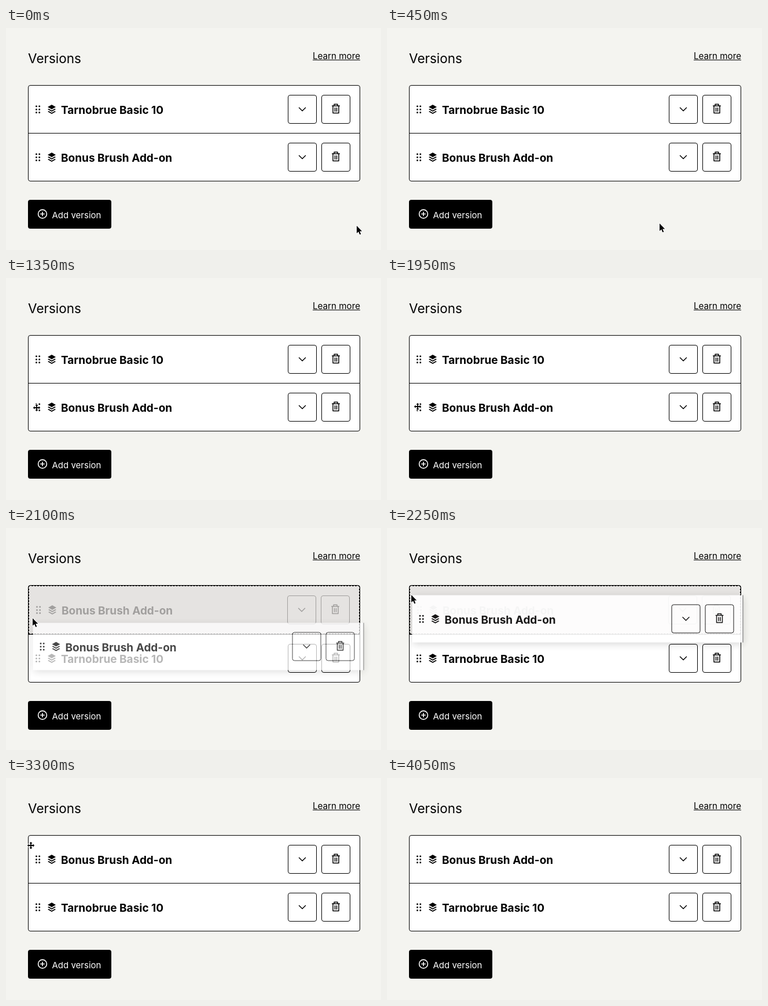
Recreate the animation shown at these times as an HTML page. Size 648 by 385 pixels, loop 5.03 s.

```html
<!DOCTYPE html>
<html lang="en">
<head>
<meta charset="utf-8">
<title>Reorder versions</title>
<style>
  html, body { margin: 0; width: 100%; height: 100%; overflow: hidden; background: #f4f4f0; }
  svg { position: absolute; left: 0; top: 0; font-family: Inter, sans-serif; }
  .name { font-size: 19px; font-weight: 700; }
  .line { fill: none; stroke: #000; }
  .icon { fill: none; stroke: #000; stroke-width: 1.5; stroke-linecap: round; stroke-linejoin: round; }
  #slot { box-sizing: border-box; height: 84px; background: #e5e3e1; border: 1px dashed #000; }
  #ghost {
    position: absolute; box-sizing: border-box; width: 572px; height: 82px;
    background: #fff; border-right: 1px solid #444;
    box-shadow: 0 3px 13px rgba(0, 0, 0, .18);
    will-change: transform;
  }
  #ghost svg { left: -1px; top: -1px; }
  #cursor path { fill: #000; stroke: #fff; stroke-width: 2; stroke-linejoin: round; paint-order: stroke; }
</style>
</head>
<body>
<svg width="648" height="385">
  <text x="38" y="61" font-size="22.5">Versions</text>
  <text x="612" y="53.5" font-size="15.2" text-anchor="end">Learn more</text>
  <path class="line" d="M530 55.5H612"/>
  <rect id="list" class="line" x="38.5" y="99.5" width="573" rx="3.5" style="fill:#fff"/>
  <foreignObject id="holder" x="39" y="100" width="572" height="84"><div id="slot"></div></foreignObject>
  <path id="divider" class="line" d="M39 182.5H611"/>
  <g id="top"></g>
  <g id="bottom"></g>
  <g id="add">
    <rect id="face" x="38" y="298" width="144" height="50" rx="4"/>
    <g id="label" fill="#fff" stroke="#fff">
      <path d="M63 318.7v7.6M59.2 322.5h7.6" stroke-width="1.6"/>
      <circle cx="63" cy="322.5" r="7.4" fill="none" stroke-width="1.6"/>
      <text x="79.5" y="329.5" font-size="15" stroke="none">Add version</text>
    </g>
  </g>
</svg>
<div id="ghost"></div>
<svg id="cursor" width="648" height="385"><path/></svg>
<script>
const $ = id => document.getElementById(id);
const LOOP = 5030;
const BASIC = 'Tarnobrue Basic 10', BONUS = 'Bonus Brush Add-on';
const SHAPES = {
  arrow: 'M0 1V16L3.5 12.8L6 18.5L8.3 17.5L5.9 12H10.5Z',
  move: 'M0-7L3-4H1V-1H4V-3L7 0L4 3V1H1V4H3L0 7L-3 4H-1V1H-4V3L-7 0L-4-3V-1H-1V-4H-3Z'
};

// start, cursor shape, x, y, [ghost dx, ghost y, ghost opacity]
const STEPS = [
  [0, 'arrow', 606, 342],
  [450, 'arrow', 471, 338],
  [600, 'arrow', 195, 310],
  [750, 'arrow', 76, 277],
  [900, 'arrow', 37, 230],
  [1050, 'arrow', 40, 220],
  [1200, 'move', 52, 225],
  [1350, 'move', 53, 225],
  [1950, 'move', 53, 223],
  [2100, 'arrow', 46, 155.5, [7.5, 163.5, .72]],
  [2250, 'arrow', 42, 115, [4.5, 115.5, .9]],
  [2400, 'arrow', 42, 114, [3.5, 114.5, .92]],
  [3300, 'move', 43, 117],
  [3750, 'arrow', 73, 111],
  [3900, 'arrow', 617, 217],
  [4050, '', 0, 0]
];

function row(name, inset = 0) {
  const dots = [36.8, 42.2, 47.6].map(y => `M14.5 ${y}h0M19.7 ${y}h0`).join('');
  return `<g transform="translate(${inset} ${inset})">
      <path class="icon" style="stroke-width:3" d="${dots}"/>
      <path d="M41 34l7 4-7 4-7-4zM34 42l1.8-1 5.2 3 5.2-3 1.8 1-7 4zM34 46l1.8-1 5.2 3 5.2-3 1.8 1-7 4z"/>
      <text class="name" x="57" y="50.3">${name}</text>
    </g>
    <g transform="translate(${-inset} ${inset})">
      <rect class="line" x="449.5" y="17.5" width="49" height="49" rx="3.5"/>
      <rect class="line" x="507.5" y="17.5" width="49" height="49" rx="3.5"/>
      <path class="icon" d="M468.5 39.2l5.5 5.5 5.5-5.5"/>
      <path class="icon" d="M525.7 36h12.6M529 35.5v-2.3h6V35.5M527 36.5v12h10V36.5M530.5 39.5v6M533.5 39.5v6"/>
    </g>`;
}

$('ghost').innerHTML = `<svg width="574" height="84">${row(BONUS)}</svg>`;

let shown;
function show(step) {
  const [start, shape, x, y, ghost] = step;
  const swapped = start >= 2100, hover = start === 750, shift = ghost ? 2 : 0;

  $('list').setAttribute('height', 166 + shift);
  $('holder').style.display = $('ghost').style.display = ghost ? '' : 'none';
  $('divider').setAttribute('transform', `translate(0 ${shift})`);
  $('top').innerHTML = row(swapped ? BONUS : BASIC, ghost ? 1 : 0);
  $('top').setAttribute('transform', 'translate(38 99)');
  $('top').setAttribute('opacity', ghost ? .3 : 1);
  $('bottom').innerHTML = row(swapped ? BASIC : BONUS);
  $('bottom').setAttribute('transform', `translate(38 ${182 + shift})`);
  $('add').setAttribute('transform', `translate(0 ${shift})`);
  $('face').setAttribute('fill', hover ? '#120a10' : '#000');
  $('label').setAttribute('opacity', hover ? .87 : 1);

  if (ghost) {
    const [dx, top, opacity] = ghost;
    Object.assign($('ghost').style, { transform: `translate(${39 + dx}px, ${top + 1}px)`, opacity });
  }
  const pointer = $('cursor').firstChild;
  pointer.setAttribute('d', SHAPES[shape] || '');
  pointer.setAttribute('transform', `translate(${x} ${y}) scale(.88)`);
}

function frame(now) {
  const t = now % LOOP;
  const step = STEPS.findLast(s => s[0] <= t);
  if (step !== shown) show(shown = step);
  requestAnimationFrame(frame);
}
$('ghost').style.left = $('ghost').style.top = 0;
frame(performance.now());
</script>
</body>
</html>
```
